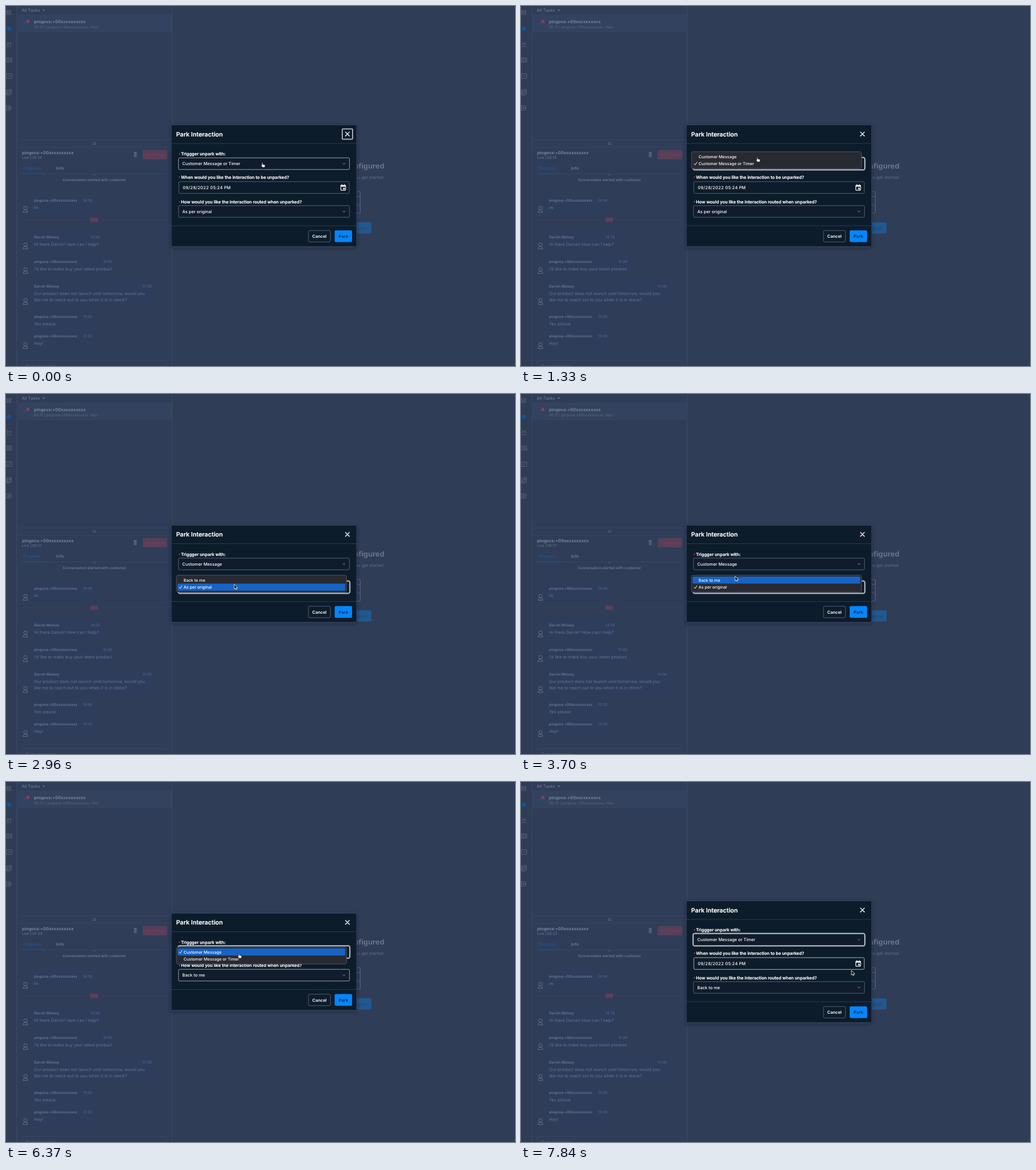
Write an HTML page that moves like this. It is 890x629 px and loops after 7.99 s.

```html
<!DOCTYPE html>
<html lang="en">
<head>
<meta charset="utf-8">
<title>Park Interaction</title>
<style>
html, body { margin: 0; width: 100%; height: 100%; overflow: hidden; background: #303d56; }
svg { display: block; width: 890px; height: 629px; }
text { font-family: Inter, "Liberation Sans", sans-serif; text-rendering: geometricPrecision; white-space: pre; }
.strong { stroke: #fff; stroke-width: .2px; }
.date { font-variant-numeric: tabular-nums; letter-spacing: .15px; }
</style>
</head>
<body>
<svg viewBox="0 0 890 629">
  <defs>
    <filter id="shade" x="-10%" y="-10%" width="120%" height="125%">
      <feDropShadow dx="0" dy="2" stdDeviation="3.5" flood-color="#121c2d" flood-opacity=".4"/>
    </filter>
  </defs>
  <g id="page"></g>
  <g id="clock"></g>
  <g id="modal"></g>
  <g id="cursor"></g>
</svg>
<script>
const LOOP = 7990;
const S = 7.47, XS = 6.4;
const PHONE = 'pingova:+00xxxxxxxxxx', AGENT = 'Darvin Melsey';
const TRIGGERS = ['Customer Message', 'Customer Message or Timer'];
const ROUTES = ['Back to me', 'As per original'];
const DIM = '#6c7890', FAINT = '#5c6a85', LINE = '#394863';
const PLUM = '#54405a', RED = '#873750', BLUE = '#1d5491';
const BODY = '#101c2c', EDGE = '#66728c', LIGHT = '#a4aab5';

const $ = id => document.getElementById(id);

// Text is placed by the middle of its line.
const text = (x, cy, str, size, fill, weight = 400, anchor = 'start', cls = '') =>
  `<text x="${x}" y="${cy + size * .36}" font-size="${size}" fill="${fill}" font-weight="${weight}" text-anchor="${anchor}" class="${cls}">${str}</text>`;
const rect = (x, y, w, h, fill, rx = 0, more = '') =>
  `<rect x="${x}" y="${y}" width="${w}" height="${h}" rx="${rx}" fill="${fill}" ${more}/>`;
const box = (x, y, w, h, stroke, rx = 2, width = .8, fill = 'none') =>
  rect(x, y, w, h, fill, rx, `stroke="${stroke}" stroke-width="${width}"`);
const path = (d, stroke, width = .9, fill = 'none') =>
  `<path d="${d}" fill="${fill}" stroke="${stroke}" stroke-width="${width}" stroke-linecap="round" stroke-linejoin="round"/>`;
const disc = (x, y, r, fill) => `<circle cx="${x}" cy="${y}" r="${r}" fill="${fill}"/>`;

function avatar(y) {
  return `<g fill="none" stroke="#66748f" stroke-width=".9"><circle cx="34" cy="${y - 2}" r="3"/>` +
    `<path d="M29.8 ${y + 5.3}q.3-3.6 3-3.8h2.4q2.7.2 3 3.8z"/></g>`;
}

function bubble(y, w, h, name, time, lines, face) {
  return rect(45, y, w, h, '#2d3d5b', 3) +
    text(49, y + 8.7, name, XS, DIM, 600) +
    text(45 + w - 4, y + 8.7, time, XS, FAINT, 400, 'end') +
    lines.map((s, i) => text(49, y + 21.7 + i * 10.7, s, S, '#66748d')).join('') +
    (face ? avatar(face) : '');
}

function rail() {
  const c = '#58667f', d = [
    'M1.5 8h7v2.500h-7zM1.500 12.500h7v2.500h-7z',
    'M3 63.500v6.500M3 66h5M8 63v5M2 71h3M6 71h3',
    'M1 91h9v7h-9zM3.500 91v7M5.500 93.500h3M5.500 95.500h3',
    'M1 118.500h9v8h-9zM2.500 124l2-2 1.500 1.200 2.500-2.700',
    'M2.500 146h7v7.500h-7zM1 148v7.500h6M4.500 151v-2M6 151v-3M7.500 151v-4',
    'M1 174h7v8h-7zM3 176.500h3M3 178.500h5l1.800-1.500M3 180h2'];
  return d.map(s => path(s, c, .9)).join('') + disc(5.5, 39.5, 3.8, '#155293');
}

function drawPage() {
  let s = rect(0, 0, 890, 629, '#303d56') + rect(0, 0, 290.5, 629, '#2f3d58') +
    rect(0, 0, 18, 629, '#2e3c56') +
    rect(18, 0, 1, 629, LINE) + rect(290, 0, 1, 629, LINE) + rect(18, 16, 272, 29, '#33425e') +
    rect(19, 15.5, 271, .7, LINE) + rect(19, 44.7, 271, .7, LINE) +
    rect(19, 233.5, 271, .8, LINE) + rect(19, 246.5, 271, .8, LINE) +
    rail();
  s += text(27.5, 7, 'All Tasks', S, DIM, 500) + path('M64 6.500h4l-2 2.200z', DIM, .3, DIM) +
    disc(33.5, 31, 3.5, '#264a78') + disc(38, 27, 3.8, '#6a3a55') + text(38, 27, '1', 5, '#a08090', 600, 'middle') +
    text(49, 27, PHONE, S, '#76829a', 700) +
    path('M152 239h5.500M152 241.500h5.500', DIM, .8);
  s += text(28, 256, PHONE, S, '#76829a', 700) +
    path('M223.500 256.500h5M224.200 256.500v7h3.700v-7M225 255.300h2M225.300 258v4M226.800 258v4', DIM, .8) +
    rect(239, 251.5, 43, 16.5, PLUM, 2) + text(260.5, 260, 'End Chat', S, RED, 600, 'middle') +
    text(30, 283.5, 'Pingovia', S, BLUE, 600) + text(87.5, 283.5, 'Info', S, DIM, 600) +
    rect(28, 293, 254, .7, LINE) + rect(28, 292.4, 42, 1.2, BLUE) +
    path('M152.500 294.500l2 1 2-1', FAINT, .8) +
    text(154.5, 304, 'Conversation started with customer', XS, DIM, 600, 'middle');
  s += rect(28, 373, 113, .9, '#573752') + rect(168, 373, 114, .9, '#573752') +
    rect(147, 369.5, 14, 8, PLUM, 2) + text(154, 373.5, 'New', 5.2, RED, 500, 'middle');
  s += bubble(331, 110, 30, PHONE, '14:58', ['Hi'], 355) +
    bubble(395, 123, 32, AGENT, '14:58', ['Hi there Darvin! How can I help?'], 419) +
    bubble(438, 145, 31, PHONE, '15:00', ['I’d like to make buy your latest product'], 462) +
    bubble(480.5, 214, 42, AGENT, '15:00',
      ['Our product does not launch until tomorrow, would you', 'like me to reach out to you when it is in stock?'], 516) +
    bubble(534, 110, 31, PHONE, '15:00', ['Yes please']) +
    bubble(568, 110, 31, PHONE, '17:20', ['Hey!'], 593);
  s += box(28, 619.5, 254, 20, LINE, 2) + text(35, 629, 'Type message', S, FAINT);
  s += text(661.5, 279, 'not configured', 12.8, '#67738a', 700, 'end') +
    text(662, 299.5, 'you get started.', S, '#5f6c85', 400, 'end') +
    path('M600 324h17.500q2 0 2 2v34q0 2-2 2h-17.500M613 333h6.500M613 346q4 1 6.500 4', '#5f6c85', .9) +
    rect(596, 378, 43, 19.5, '#21588f', 2) + text(632, 388, 'Configure', S, '#2d466d', 600, 'end');
  $('page').innerHTML = s;
}

const label = (cy, s) => disc(303.2, cy, .95, '#f2453d') + text(306, cy, s, S, '#fff', 600, 'start', 'strong');

function field(cy, value, look) {
  const y = cy - 10.2;
  const edge = { ring: '#d5d9e0', hover: '#b9c1d0' }[look] || EDGE;
  return (look === 'ring' ? box(300.7, y - .7, 300.7, 21.8, LIGHT, 3.2, 2) : '') +
    box(301.6, y, 299, 20.4, edge, 2, .8, BODY) +
    text(308.3, cy, value, S, '#fff', 500) +
    path(`M589 ${cy - .8}l1.900 1.800 1.900-1.800`, '#8f9ab0', .9);
}

function popup(y, items, ticked, lit) {
  return box(298, y - .5, 297.5, 29.5, '#5b5d66', 3, .8, '#282a33') +
    (lit >= 0 ? rect(300, y + 1.8 + lit * 12.4, 293.3, 12.4, '#1764c4', 2) : '') +
    items.map((s, i) => text(310.5, y + 8 + i * 12.4, s, 7.15, '#fff', 500)).join('') +
    path(`M303 ${y + 8.3 + ticked * 12.4}l1.600 2 3-4.800`, '#fff', 1);
}

function drawModal(m) {
  const big = m.big, top = big ? 207.7 : 229.2, end = big ? 420.4 : 399;
  const c1 = big ? 275.5 : 297, c2 = big ? 359 : 337.5, foot = end - 18.1;
  const head = top + 16;
  let s = `<g filter="url(#shade)">${box(289, top, 324.2, end - top, '#42506a', 1.5, .8, BODY)}</g>` +
    rect(289.7, top + 32, 323, .8, '#344158') + rect(289.7, end - 36.8, 323, .8, '#344158') +
    text(297.5, head, 'Park Interaction', 10.67, '#fff', 600, 'start', 'strong') +
    (m.close ? box(588, head - 9, 18, 18, LIGHT, 1.5, 2) : '') +
    path(`M593.600 ${head - 3.4}l6.800 6.800m0-6.800l-6.800 6.800`, '#e4e8ef', 1.5) +
    label(c1 - 17, 'Triggger unpark with:') + field(c1, TRIGGERS[m.trig], m.a);
  if (big) {
    s += label(299, 'When would you like the interaction to be unparked?') +
      box(302.2, 306.9, 298, 20.5, m.date ? '#d5d9e0' : EDGE, 2, .8) +
      text(309, 317, '09/28/2022 05:24 PM', S, '#fff', 500, 'start', 'date') +
      box(585.4, 313.3, 8.4, 8.6, '#fff', .8, 1.1) + rect(585.2, 313, 8.8, 2.6, '#fff') +
      rect(586.6, 311.5, 1.2, 2, '#fff') + rect(591.4, 311.5, 1.2, 2, '#fff') + rect(589.6, 317.6, 2.8, 2.8, '#fff');
  }
  s += label(c2 - 17, 'How would you like the interaction routed when unparked?') + field(c2, ROUTES[m.route], m.b) +
    box(528.9, foot - 10, 38.4, 19.9, EDGE, 2) + text(548, foot, 'Cancel', S, '#fff', 600, 'middle') +
    rect(574.7, foot - 10.3, 30.4, 20.5, '#0486ff', 2) + text(590, foot, 'Park', S, '#0d2444', 600, 'middle');
  if (m.pop === 'a') s += popup(c1 - 8 - m.trig * 12.4, TRIGGERS, m.trig, m.lit);
  if (m.pop === 'b') s += popup(c2 - 8 - m.route * 12.4, ROUTES, m.route, m.lit);
  $('modal').innerHTML = s;
}

function drawClock(sec) {
  const t = '05:' + sec;
  $('clock').innerHTML = text(49, 36.5, `${t} | ${PHONE}: Hey!`, XS, FAINT) +
    text(28, 265, `Live | ${t}`, XS, DIM);
}

const ARROW = path('M0 0v7.800l1.900-1.700 1.200 2.800 1.400-.6-1.200-2.700h2.400z', '#fff', .8, '#0a0d14');
const HAND = path('M1.700 5.200V.9q.9-1 1.600 0v2.700l3.600.8q.9.400.7 1.500l-.7 3h-3.900l-2.700-3.300q.3-.9 1.400-.4z', '#10141d', .7, '#fff');

// Each step changes the state left by the one before it.
const STEPS = [
  [0, { x: 445.5, y: 273, hand: 1, sec: 14, big: 1, trig: 1, route: 1, a: 'hover', b: '', close: 1, date: 0, pop: '', lit: -1 }],
  [150, { close: 0, a: 'ring' }],
  [300, { pop: 'a', lit: 1 }],
  [440, { x: 440, y: 271 }],
  [590, { x: 428, y: 267, lit: 0 }],
  [740, { x: 418, y: 264.5 }],
  [890, { x: 413, y: 263.5, sec: 15 }],
  [1030, { x: 410.5, y: 263.5 }],
  [1330, { lit: -1 }],
  [1480, { lit: 0 }],
  [1630, { pop: '', trig: 0 }],
  [1780, { big: 0, hand: 0, x: 412.6, y: 263.2 }],
  [2370, { x: 406, y: 311 }],
  [2520, { x: 402, y: 320.5 }],
  [2810, { x: 399, y: 333, hand: 1, a: '', b: 'ring' }],
  [2960, { pop: 'b', lit: 1, hand: 0, sec: 17 }],
  [3100, { x: 391, y: 334 }],
  [3550, { x: 380, y: 326, lit: 0 }],
  [3700, { x: 374.2, y: 318.7 }],
  [3840, { x: 371, y: 321, sec: 18 }],
  [3990, { x: 369, y: 323 }],
  [4290, { x: 368.6, y: 323.8 }],
  [4590, { lit: -1 }],
  [4740, { pop: '', route: 0, sec: 19 }],
  [5340, { x: 375.5, y: 320.5, hand: 1 }],
  [5480, { x: 394, y: 309 }],
  [5630, { x: 404.5, y: 299, a: 'hover' }],
  [5930, { sec: 20 }],
  [6370, { pop: 'a', lit: 0, a: 'ring', b: 'hover' }],
  [6520, { b: '', y: 301 }],
  [6660, { y: 304, lit: 1 }],
  [6810, { y: 306 }],
  [6960, { sec: 21 }],
  [7110, { lit: -1 }],
  [7250, { lit: 1 }],
  [7400, { pop: '', trig: 1 }],
  [7550, { big: 1, x: 424, y: 309, hand: 0 }],
  [7690, { x: 525, y: 322, date: 1 }],
  [7840, { x: 577.8, y: 329.5, sec: 22 }]
];

let carry = {};
const states = STEPS.map(([t, change]) => [t, carry = { ...carry, ...change }]);

let shown = -1;
function tick() {
  const t = performance.now() % LOOP;
  const i = states.findLastIndex(s => s[0] <= t);
  if (i !== shown) {
    const m = states[shown = i][1];
    drawClock(m.sec);
    drawModal(m);
    $('cursor').setAttribute('transform', `translate(${m.x} ${m.y})`);
    $('cursor').innerHTML = m.hand ? HAND : ARROW;
  }
  requestAnimationFrame(tick);
}
drawPage();
tick();
</script>
</body>
</html>
```
